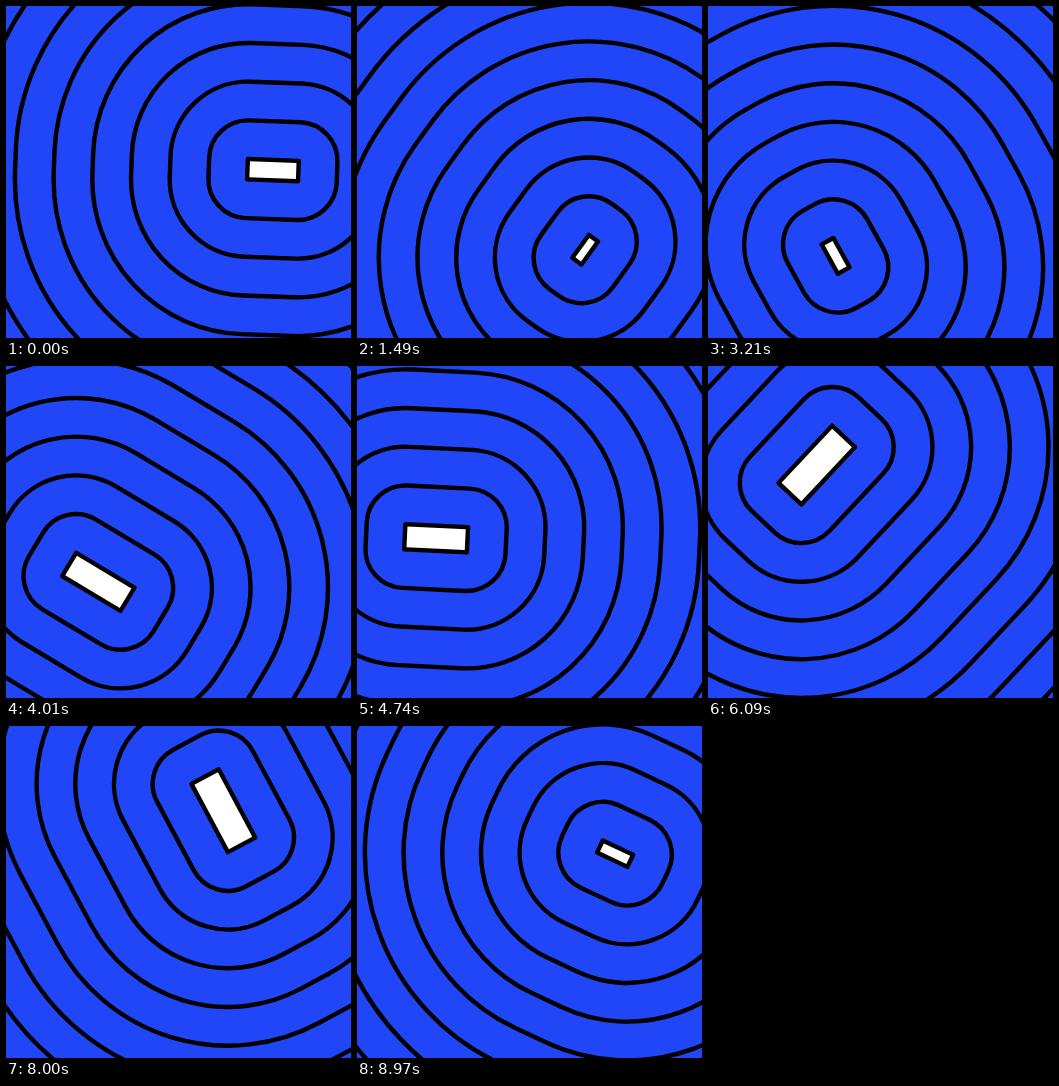
Animation, 345 px wide and 332 px high, one loop 9.07 s. Source, as an HTML page with a canvas:

```html
<!DOCTYPE html>
<html lang="en">
<head>
<meta charset="utf-8">
<title>Orbiting rectangle with distance rings</title>
<style>
  html, body { margin: 0; width: 100%; height: 100%; overflow: hidden; background: #2046f8; }
  canvas { display: block; }
</style>
</head>
<body>
<canvas id="stage" width="345" height="332"></canvas>
<script>
const canvas = document.getElementById('stage');
const ctx = canvas.getContext('2d');

const LOOP = 9070;
const FIRST_STEP = 10;
const STEP_TIME = 57.65;
const LAST_STEP = 156;

const CENTER = { x: 173, y: 167.6 };
const ORBIT = 94;
const RING_GAP = 38.7;
const RING_COUNT = 13;

function stepAt(time) {
  return Math.min(LAST_STEP, 1 + Math.floor((time - FIRST_STEP) / STEP_TIME));
}

function draw(step) {
  const turn = (2.16 * step - 2.1) * Math.PI / 180;
  const width = 56 + 27.7 * Math.sin(5 * turn);
  const height = width * 0.4;

  ctx.resetTransform();
  ctx.fillStyle = '#2046f8';
  ctx.fillRect(0, 0, canvas.width, canvas.height);

  // The rectangle turns against its orbit.
  ctx.translate(CENTER.x + ORBIT * Math.cos(turn), CENTER.y + ORBIT * Math.sin(turn));
  ctx.rotate(-turn);
  ctx.fillStyle = '#fff';
  ctx.fillRect(-width / 2, -height / 2, width, height);

  ctx.lineWidth = 4.4;
  ctx.lineJoin = 'round';
  for (let i = 0; i < RING_COUNT; i++) {
    const d = i * RING_GAP;
    ctx.beginPath();
    ctx.roundRect(-width / 2 - d, -height / 2 - d, width + 2 * d, height + 2 * d, d);
    ctx.stroke();
  }
}

const start = performance.now();

function tick() {
  draw(stepAt((performance.now() - start) % LOOP));
  requestAnimationFrame(tick);
}

tick();
</script>
</body>
</html>
```
